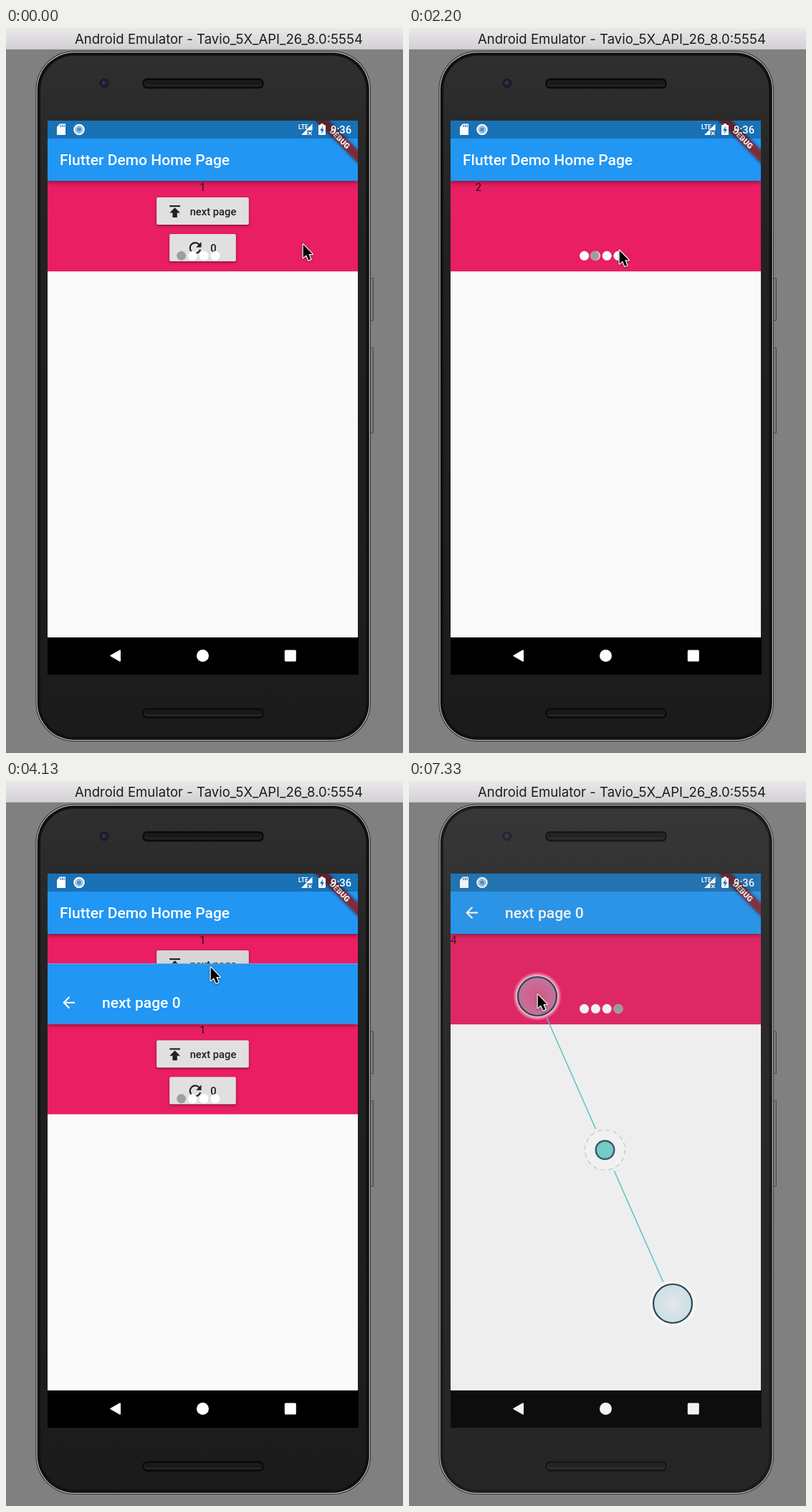
Animation of 554 by 1010 pixels, one loop 7.39 s. Source, as an HTML page with a canvas:

```html
<!DOCTYPE html>
<html lang="en">
<head>
<meta charset="utf-8">
<title>Pager demo</title>
<style>
  html, body { margin: 0; width: 100%; height: 100%; overflow: hidden; background: #808080; }
  canvas { display: block; width: 554px; height: 1010px; }
</style>
</head>
<body>
<canvas id="stage"></canvas>
<script>
const W = 554, H = 1010, LOOP = 7390, FRAMES = 111;
const LEFT = 58, TOP = 129, PAGE_W = 433, BAR = 154, CARD = 213, CARD_END = 339.3, FLOOR = 849;
const DP = 1.0535, TAU = Math.PI * 2;
const canvas = document.getElementById('stage');
const ratio = window.devicePixelRatio || 1;
canvas.width = W * ratio;
canvas.height = H * ratio;
const c = canvas.getContext('2d');

// A full swipe takes SWIPE ms, a partial one its share. Each entry: [start, pages moved]
const SWIPE = 700, STROKE = 200;
const SWIPES = [
  [50, 1], [910, 1], [1650, -1], [2000, -1], [2700, .3175], [3200, -.3175],
  [4667, 1], [5118, 1], [5950, 1]
];
// Where the hand rests between strokes: [time, x, y]
const HAND = [
  [0, 414, 300], [1400, 266, 302], [1650, 135, 303], [2700, 430, 313], [2930, 293, 319],
  [3200, 293, 319], [3750, 285, 258], [4400, 285, 258], [4870, 356, 268], [5730, 374, 282],
  [7200, 190, 297], [7330, 179, 296]
];
const PRESS = 3850, PUSH = 4047, PUSH_TIME = 300, PINCH = 6870;

const clamp = v => Math.max(0, Math.min(1, v));
const smooth = u => u * u * (3 - 2 * u);

// Cubic easing with control points (.4, 0) and (.2, 1)
function fastOutSlowIn(x) {
  let lo = 0, hi = 1;
  for (let i = 0; i < 20; i++) {
    const s = (lo + hi) / 2;
    if (1.2 * s * (1 - s) ** 2 + .6 * s * s * (1 - s) + s ** 3 < x) lo = s; else hi = s;
  }
  return smooth(lo);
}

function scrollAt(t) {
  return SWIPES.reduce((sum, [start, step]) =>
    sum + step * smooth(clamp((t - start) / (SWIPE * Math.abs(step)))), 0);
}

// Each full forward swipe pulls the pointer left and lets it come back
function pointerAt(t) {
  const next = HAND.findIndex(key => key[0] > t);
  const b = HAND[next < 0 ? HAND.length - 1 : next];
  const a = next < 0 ? b : HAND[next - 1];
  const u = a === b ? 0 : smooth((t - a[0]) / (b[0] - a[0]));
  const pull = SWIPES.filter(s => s[1] === 1).reduce((sum, [start]) =>
    Math.max(sum, Math.sin(Math.PI * clamp((t - start) / SWIPE)) ** 2), 0);
  return [a[1] + (b[1] - a[1]) * u - STROKE * pull, a[2] + (b[2] - a[2]) * u];
}

function box(x, y, w, h, color) {
  c.fillStyle = color;
  c.fillRect(x, y, w, h);
}
function round(x, y, w, h, r, color) {
  c.beginPath();
  c.roundRect(x, y, w, h, r);
  c.fillStyle = color;
  c.fill();
}
function disc(x, y, r, color) {
  c.beginPath();
  c.arc(x, y, r, 0, TAU);
  c.fillStyle = color;
  c.fill();
}
function ring(x, y, r, width, color, from = 0, to = TAU) {
  c.beginPath();
  c.arc(x, y, r, from, to);
  c.lineWidth = width;
  c.strokeStyle = color;
  c.stroke();
}
function poly(color, ...points) {
  c.beginPath();
  points.forEach(p => c.lineTo(...p));
  c.closePath();
  c.fillStyle = color;
  c.fill();
}
function line(width, color, ...points) {
  c.beginPath();
  points.forEach(p => c.lineTo(...p));
  c.lineWidth = width;
  c.strokeStyle = color;
  c.stroke();
}
function text(s, x, y, size, color, weight = 400, align = 'left', family = 'Roboto') {
  c.font = `${weight} ${size}px ${family}, sans-serif`;
  c.textAlign = align;
  c.fillStyle = color;
  c.fillText(s, x, y);
}
function fade(y0, y1, ...colors) {
  const g = c.createLinearGradient(0, y0, 0, y1);
  colors.forEach((color, i) => g.addColorStop(i / (colors.length - 1), color));
  return g;
}
function halo(x, y, r0, r1, ...colors) {
  const g = c.createRadialGradient(x, y, r0, x, y, r1);
  colors.forEach((color, i) => g.addColorStop(i / (colors.length - 1), color));
  return g;
}
function shadow(color, blur, dy) {
  c.shadowColor = color;
  c.shadowBlur = blur * ratio;
  c.shadowOffsetY = dy * ratio;
}
function clipTo(x, y, w, h) {
  c.beginPath();
  c.rect(x, y, w, h);
  c.clip();
}

// Icons are drawn around their centre on a 24 unit grid
const icons = {
  publish(color) {
    box(-7, -8, 14, 2, color);
    poly(color, [-7, 2], [0, -5], [7, 2]);
    box(-3, 1.5, 6, 6.5, color);
  },
  refresh(color) {
    ring(0, 0, 7, 2, color, .29, TAU - .75);
    poly(color, [1, -1], [8, -1], [8, -8]);
  },
  back(color) {
    line(2, color, [-6.5, 0], [8, 0]);
    line(2, color, [.7, -7.3], [-6.6, 0], [.7, 7.3]);
  }
};
function icon(name, x, y, color) {
  c.save();
  c.translate(x, y);
  c.scale(DP, DP);
  icons[name](color);
  c.restore();
}

function windowBar() {
  box(0, 0, W, 30, fade(0, 30, '#ebe8eb', '#d3d0d3'));
  box(0, 29.5, W, 1, '#b0aeb0');
  text('Android Emulator - Tavio_5X_API_26_8.0:5554', 96, 22, 18.55, '#1c1c1c', 400, 'left', 'Inter');
}

function grille(y) {
  round(190.5, y, 169, 14.5, 6, '#0b0b0b');
  round(193, y + 3, 164, 8.5, 4, '#262626');
  round(194, y + 3.5, 162, 5.5, 3, '#191919');
}

function sideKey(y, h) {
  round(508, y, 5, h, 1.5, '#4a4a4a');
  box(509.5, y + 1, 2, h - 2, '#8d8d8d');
}

function phone() {
  const shell = (inset, color) =>
    round(41.5 + inset, 32 + inset, 467.5 - 2 * inset, 962 - 2 * inset, 54 - inset, color);
  box(0, 30, W, H - 30, '#808080');
  sideKey(348, 60);
  sideKey(445, 120);
  shell(0, '#2a2a2a');
  shell(1, '#bdbdbd');
  shell(2.2, '#101010');
  shell(6.5, fade(38, 988, '#2f2f2f', '#222222', '#1f1f1f', '#1e1e1e', '#1b1b1b'));
  disc(137, 77, 6.5, '#1a1a1e');
  disc(137, 77, 4, '#25253a');
  disc(136, 76, 1.8, '#3d3a58');
  grille(70);
  grille(947.5);
}

function button(center, y, w, label, name, face) {
  const x = center - w / 2;
  c.save();
  shadow('rgba(0,0,0,.42)', 3.5, 1.6);
  round(x, y, w, 38, 2, face);
  c.restore();
  const wide = w > 100;
  icon(name, x + (wide ? 25.5 : 36), y + 19.5, '#1f1f1f');
  text(label, x + (wide ? 46.5 : 57), y + 24.5, 14.75, '#1f1f1f', 500);
}

function pager(pos, face) {
  const ink = 'rgba(0,0,0,.8)', dot = i => 244.6 + i * 15.8;
  c.save();
  clipTo(LEFT, CARD, PAGE_W, CARD_END - CARD);
  box(LEFT, CARD, PAGE_W, CARD_END - CARD, '#e91e63');
  for (let i = 0; i < 4; i++) {
    const x = LEFT + (i - pos) * PAGE_W, mid = x + PAGE_W / 2;
    if (i) {
      text(i + 1, x, 227, 14.75, ink);
    } else {
      text('1', mid, 227, 14.75, ink, 400, 'center');
      button(mid, 236, 128.7, 'next page', 'publish', face);
      button(mid, 287, 92.7, '0', 'refresh', '#e0e0e0');
    }
  }
  for (let i = 0; i < 4; i++) disc(dot(i), 317.3, 6.5, '#fff');
  disc(dot(pos), 317.3, 6.5, '#9e9e9e');
  c.restore();
}

function screen(pos, nested, face = '#e0e0e0') {
  box(LEFT, TOP, PAGE_W, FLOOR - TOP, '#fafafa');
  pager(pos, face);
  c.save();
  clipTo(LEFT, TOP, PAGE_W, FLOOR - TOP);
  shadow('rgba(0,0,0,.45)', 6, 2);
  box(LEFT, TOP, PAGE_W, CARD - TOP, '#2196f3');
  c.restore();
  if (nested) icon('back', 87.7, 183.5, '#fff');
  text(nested ? 'next page 0' : 'Flutter Demo Home Page', nested ? 134 : 75, 191, 21.07, '#fff', 500);
}

function debugRibbon() {
  c.save();
  clipTo(LEFT, TOP, PAGE_W, 80);
  c.translate(466, 154);
  c.rotate(Math.PI / 4);
  c.filter = `blur(${2 * ratio}px)`;
  box(-60, -6.3, 120, 12.6, 'rgba(0,0,0,.5)');
  c.filter = 'none';
  box(-60, -6.3, 120, 12.6, 'rgba(183,28,28,.63)');
  text('DEBUG', 0, 3.9, 10.75, '#fff', 900, 'center');
  c.restore();
}

function statusBar() {
  const tint = '#1970b6';
  box(LEFT, TOP, PAGE_W, BAR - TOP, 'rgba(0,0,0,.25)');
  poly('#fff', [75, 133.5], [83, 133.5], [83, 149], [71, 149], [71, 138]);
  for (let x = 75.5; x < 82; x += 2.5) box(x, 135, 1.2, 3, tint);
  disc(102, 141.5, 7.8, '#f4f8fc');
  ring(102, 141.5, 4.6, 1.6, '#7fb2dc');
  disc(102, 141.5, 3.2, '#4f93cb');
  text('LTE', 408, 141, 8.5, '#fff', 700);
  poly('#fff', [427.5, 133.5], [427.5, 142.5], [420.5, 142.5], [420.5, 149], [412, 149]);
  line(1.3, '#fff', [422, 144.5], [426.5, 149]);
  line(1.3, '#fff', [426.5, 144.5], [422, 149]);
  round(436, 135, 10, 14, 1, '#fff');
  box(439, 133.3, 4, 2, '#fff');
  poly(tint, [442, 136.5], [438.2, 143], [440.6, 143], [440.2, 147.5], [444, 141], [441.6, 141]);
  text('9:36', 453, 147, 14.75, '#fff', 500);
}

function navBar() {
  box(LEFT, FLOOR, PAGE_W + 1, 52, '#000');
  c.save();
  c.lineJoin = 'round';
  c.lineWidth = 2;
  c.strokeStyle = '#fff';
  poly('#fff', [146.3, 874.5], [159, 867.3], [159, 881.7]);
  c.stroke();
  c.restore();
  disc(274.5, 874.5, 8.5, '#fff');
  round(388.8, 866.6, 16, 16, 1.5, '#fff');
}

function handle(x, y) {
  ring(x, y, 30.5, 7, halo(x, y, 27, 34, 'rgba(255,255,255,.9)', 'rgba(255,255,255,.4)', 'rgba(255,255,255,0)'));
  disc(x, y, 27, halo(x, y, 2, 27, 'rgba(190,212,220,.28)', 'rgba(160,205,218,.46)'));
  ring(x, y, 27, 2.2, '#2c4653');
}

function pinch(x, y) {
  const cx = 273.5, cy = 514, dx = x - cx, dy = y - cy, len = Math.hypot(dx, dy);
  box(0, 30, W, H - 30, 'rgba(128,128,128,.1)');
  for (const side of [1, -1]) {
    const at = d => [cx + side * dx / len * d, cy + side * dy / len * d];
    line(1.5, '#5bc2c6', at(32), at(len - 33));
    handle(...at(len));
  }
  disc(cx, cy, 28, 'rgba(255,255,255,.18)');
  c.setLineDash([6.5, 4.5]);
  ring(cx, cy, 28, 1.2, '#b3cbcd');
  c.setLineDash([]);
  disc(cx, cy, 13, '#74cbc8');
  ring(cx, cy, 12.8, 2.4, '#3c5b66');
}

function cursor(x, y) {
  c.save();
  c.translate(x + .7, y + 1.6);
  shadow('rgba(0,0,0,.4)', 2.5, 1);
  c.lineWidth = 2.4;
  c.strokeStyle = '#fff';
  c.lineJoin = 'round';
  poly('#000', [0, 0], [0, 18.5], [4.4, 14.6], [7.5, 22], [10.6, 20.7], [7.6, 13.4], [13, 13.4]);
  c.stroke();
  c.shadowColor = 'transparent';
  c.fill();
  c.restore();
}

function draw(t) {
  const pos = scrollAt(t), [x, y] = pointerAt(t);
  const push = clamp((t - PUSH) / PUSH_TIME);
  c.setTransform(ratio, 0, 0, ratio, 0, 0);
  windowBar();
  phone();
  if (push < 1) screen(pos, false, t > PRESS ? '#d6d6d6' : '#e0e0e0');
  if (push > 0) {
    c.save();
    clipTo(LEFT, TOP, PAGE_W, FLOOR - TOP);
    c.globalAlpha = clamp(push * 4);
    c.translate(0, 180 * (1 - fastOutSlowIn(push)));
    screen(pos, true);
    c.restore();
  }
  debugRibbon();
  statusBar();
  navBar();
  if (t >= PINCH) pinch(x, y + 4);
  cursor(x, y);
}

// The picture advances about fifteen times a second
function tick() {
  const n = Math.floor(performance.now() % LOOP / (LOOP / FRAMES));
  draw(Math.round(n * 20 / 3) * 10);
  requestAnimationFrame(tick);
}
tick();
</script>
</body>
</html>
```
